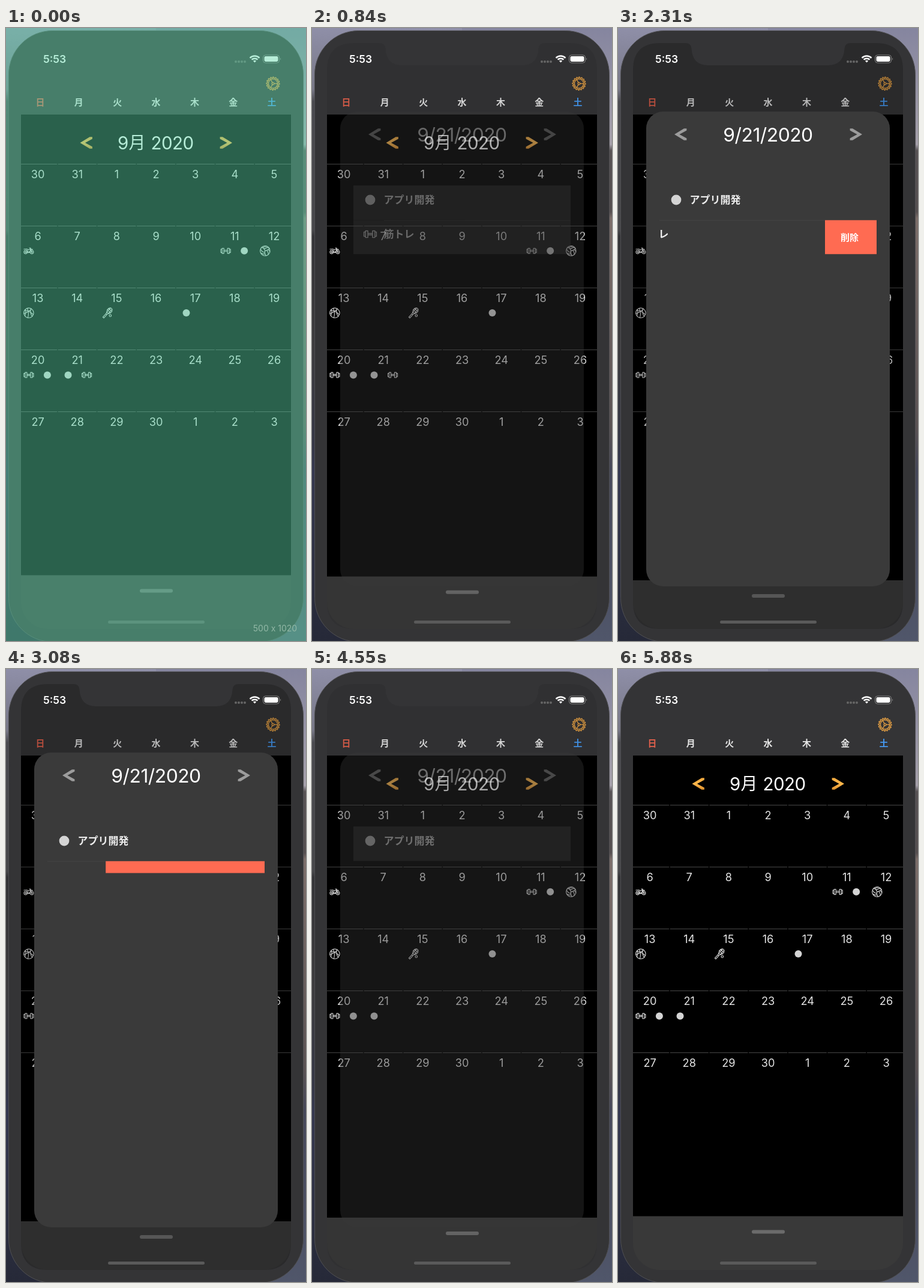
These frames come from a looping animation (500x1020 px, 5950 ms). An HTML page:

```html
<!DOCTYPE html>
<html lang="ja">
<head>
<meta charset="utf-8">
<title>Calendar</title>
<style>
html, body { margin: 0; width: 100%; height: 100%; overflow: hidden; background: #333; }
svg { display: block; width: 500px; height: 1020px; }
text { font-family: Inter, "Noto Sans CJK JP", "Noto Sans CJK", sans-serif; fill: #fff; }
.mid { text-anchor: middle; }
.jp { font-family: "Noto Sans CJK JP", "Noto Sans CJK", sans-serif; font-weight: 700; }
.icon { fill: none; stroke: #dedede; stroke-width: 1.1; stroke-linecap: round; stroke-linejoin: round; }
</style>
</head>
<body>
<svg id="stage" viewBox="0 0 500 1020" xmlns="http://www.w3.org/2000/svg"></svg>
<script>
const LOOP = 5950, STEP = 70;
const stage = document.getElementById('stage');
const $ = id => document.getElementById(id);

// Time points in ms
const OPEN = 700, SWIPE = 1750, REMOVE = 2870, CLOSE = 4340;

const clamp = v => Math.max(0, Math.min(1, v));
const ramp = (t, from, len) => clamp((t - from) / len);
const ease = p => p * p * (3 - 2 * p);
const easeOut = p => 1 - Math.pow(1 - p, 3);

const tag = (name, attrs, body = '') =>
  `<${name} ${Object.entries(attrs).map(([k, v]) => `${k}="${v}"`).join(' ')}>${body}</${name}>`;
const rect = (x, y, width, height, fill, more = {}) => tag('rect', { x, y, width, height, fill, ...more });
const label = (x, y, size, body, more = {}) => tag('text', { x, y, 'font-size': size, ...more }, body);
const path = (d, more = {}) => tag('path', { d, ...more });
const circle = (cx, cy, r, more = {}) => tag('circle', { cx, cy, r, ...more });
const stops = list => list.map(([offset, c]) => tag('stop', { offset, 'stop-color': c })).join('');
const vertical = (id, list) => tag('linearGradient', { id, x1: 0, y1: 0, x2: 0, y2: 1 }, stops(list));

// Icons, centred on 0,0 in a box of about 18 px
const icons = {
  dumbbell: path('M-3 -1H3V1H-3ZM-6 -4.3H-3V4.3H-6ZM3 -4.3H6V4.3H3ZM-8 -2.8H-6V2.8H-8ZM6 -2.8H8V2.8H6Z'),
  dot: circle(0, 0, 6, { fill: '#d4d4d4', stroke: 'none' }),
  moto: circle(-5.2, 2, 2.8) + circle(5.2, 2, 2.8) + circle(-5.2, 2, .8) + circle(5.2, 2, .8) +
    path('M-8 -2.8L-3 -3L-.5 -1.6L2.6 -3.2L5.2 2M1 -4.8H3L4 -2.4H6.5M-5 2L-2 2.8H1.5L3 -2.5M-3 -1L-1 1.5H1.5'),
  basket: circle(0, 0, 8.2) +
    path('M-7 -4.3Q1 -4 7.6 3M-2.6 -7.8Q1 0 -1.5 8M-8.1 1Q0 -1.5 4.5 -6.8M3.6 -7.3Q1.5 1 6 5.6M-6.4 5Q-4 -1.5 -5.8 -5.6'),
  volley: circle(0, 0, 8.2) +
    path('M0 0Q-1 -4.5 -5.5 -6M0 0Q4.5 -1 7.2 -4M0 0Q-1.5 4 1.5 8M-2 -3Q3 -6.5 6 -5.5M-4 -5Q0 -8 3 -7.5M2.5 -1Q6 2 5.2 6.2M5 -2.3Q8 0 8 2M-.5 2.5Q-5 2.5 -7.4 -2.5M-.3 5Q-4 6 -7.2 3.5'),
  racket: tag('g', { transform: 'rotate(42)' },
    tag('ellipse', { cx: 0, cy: -5, rx: 3.9, ry: 5 }) +
    path('M-1.6 -9.3V-.8M1.6 -9.3V-.8M-3.7 -6.6H3.7M-3.7 -3.6H3.7M-2 -.6L-.8 3H.8L2 -.6M-1.1 3H1.1V10.5H-1.1Z')) +
    circle(4.6, 4.4, 1.8)
};
const icon = (name, x, y, scale = 1) =>
  tag('g', { class: 'icon', transform: `translate(${x} ${y}) scale(${scale})` }, icons[name]);

const arrow = (x, y, dir, fill) => path('M-10 0L6 -9.8H10.4V-6.6L-1.6 0L10.4 6.6V9.8H6Z',
  { fill, transform: `translate(${x} ${y}) scale(${dir} 1)` });

function gear(cx, cy) {
  let d = '';
  for (let i = 0; i < 64; i++) {
    const a = i * Math.PI / 32, r = i % 4 < 2 ? 11 : 9;
    d += `${i ? 'L' : 'M'}${(r * Math.cos(a)).toFixed(2)} ${(r * Math.sin(a)).toFixed(2)}`;
  }
  const spokes = [0, 120, 240].map(a => path('M1.8 0H7.8', { transform: `rotate(${a})` })).join('');
  return tag('g', { transform: `translate(${cx} ${cy})`, fill: 'none', stroke: '#e5a044', 'stroke-width': 1.3 },
    path(d + 'Z') + circle(0, 0, 7.6) + circle(0, 0, 1.8) + spokes);
}

const backdrop = () =>
  rect(0, 0, 250, 1020, 'url(#left)') + rect(250, 0, 250, 1020, 'url(#right)') +
  rect(4.5, 4.5, 491, 1017, '#343436', { rx: 73, stroke: '#505053', 'stroke-width': 1 });

function header() {
  const days = [...'日月火水木金土'].map((d, i) => label(57 + i * 64.35, 128.5, 15, d, {
    class: 'mid jp', style: `fill:${i === 0 ? '#e0604c' : i === 6 ? '#4597ee' : '#e6e6e6'}`
  }));
  return gear(445, 92.5) + days.join('');
}

function calendar() {
  const colW = 65.65, left = 20.3, rowY = r => 226.5 + r * 103;
  let out = rect(25, 144, 450, 775, '#000');
  for (let r = 0; r < 5; r++) {
    for (let c = 0; c < 7; c++) {
      const x = left + c * colW, day = r * 7 + c - 1;
      const n = day < 1 ? day + 31 : day > 30 ? day - 30 : day;
      const x1 = Math.max(25, x + .8), x2 = Math.min(475, x + colW - .8);
      out += rect(x1, rowY(r) - .5, x2 - x1, 1, '#484848') +
        label(x + 32.8, rowY(r) + 23, 18.2, n, { class: 'mid', style: 'fill:#e4e4e4' });
    }
  }
  const put = (name, r, c, slot = 0) => icon(name, left + c * colW + 17.6 + slot * 31, rowY(r) + 41 + r * .3);
  out += put('moto', 1, 0) + put('dumbbell', 1, 5) + put('dot', 1, 5, 1) + put('volley', 1, 6) +
    put('basket', 2, 0) + put('racket', 2, 2) + put('dot', 2, 4) +
    put('dumbbell', 3, 0) + put('dot', 3, 0, 1) + put('dot', 3, 1) +
    tag('g', { id: 'mark' }, put('dumbbell', 3, 1, 1));
  out += arrow(133.5, 191, 1, 'url(#gold)') + arrow(367, 191, -1, 'url(#gold)') +
    label(186, 201.5, 29.5, '9') +
    label(204.5, 201, 28, '月', { style: 'font-family:"Noto Sans CJK JP","Noto Sans CJK",sans-serif;font-weight:400' }) +
    label(277, 201.5, 29.5, '2020', { class: 'mid', 'letter-spacing': -.5 });
  return out;
}

const panel = () => tag('g', { 'clip-path': 'url(#screen)' },
  tag('g', { id: 'panel' }, rect(25, 910.5, 450, 100, '#393939') + rect(223, 933.5, 55, 6, '#6b6b6b', { rx: 3 })));

const dim = () => path(
  'M70 25H112Q122 25 122.500 34Q124 62 150 62H350Q376 62 377.500 34Q378 25 388 25H430Q475 25 475 70V955Q475 1000 430 1000H70Q25 1000 25 955V70Q25 25 70 25Z',
  { id: 'dim', fill: '#000' });

// Each part of the card fades by itself, so overlaps show while it opens.
function card() {
  const fade = body => tag('g', { class: 'fade' }, body);
  const row = (y, name, title, scale) => icon(name, 97, y + 24, scale) +
    label(119.500, y + 29.5, 17, title, { class: 'jp', style: 'fill:#ececec' });
  return fade(rect(47, 139, 406, 790, '#3a3a3a', { rx: 28 })) +
    fade(arrow(104, 177, 1, '#9c9c9c') + arrow(397, 177, -1, '#9c9c9c') +
      label(250, 188.5, 31.8, '9/21/2020', { class: 'mid', 'letter-spacing': -.5 })) +
    fade(rect(69, 262, 362, 57.5, '#3a3a3a')) +
    fade(row(262, 'dot', 'アプリ開発', 1.4)) +
    tag('g', { id: 'task', 'clip-path': 'url(#row)' },
      tag('g', { id: 'slide' },
        fade(rect(69, 319.5, 362, 57, '#3a3a3a')) +
        fade(rect(120, 319.5, 311, 1, '#464647') + row(319, 'dumbbell', '筋トレ', 1.3)) +
        rect(431, 319.5, 362, 57, '#ff6b52') +
        label(472, 354, 15, '削除', { class: 'mid jp' })));
}

function statusBar() {
  const arc = r => path(`M${-r * .72} ${-r * .7}A${r} ${r} 0 0 1 ${r * .72} ${-r * .7}`,
    { fill: 'none', stroke: '#fff', 'stroke-width': 2.5 });
  return label(62, 58, 17.5, '5:53', { 'font-weight': 600 }) +
    [383, 388, 393, 398].map(x => circle(x, 56, 2, { fill: '#666' })).join('') +
    tag('g', { transform: 'translate(414.500 57.5)' }, arc(11) + arc(6.8) + path('M0 0L-2.6 -2.7Q0 -4.7 2.6 -2.7Z', { fill: '#fff' })) +
    rect(428.5, 45, 27, 13, 'none', { rx: 4, stroke: '#858585' }) +
    rect(430.5, 47, 23, 9, '#fff', { rx: 2.4 }) +
    path('M457 49.500Q459 51.500 457 53.500Z', { fill: '#858585' }) +
    rect(170, 986, 161, 5, '#5a5a5a', { rx: 2.5 });
}

const tint = () => tag('g', { id: 'tint' },
  rect(0, 0, 500, 1020, '#5dd7a9', { opacity: .45 }) +
  label(448.5, 1004, 14, '500 x 1020', { class: 'mid', style: 'fill:#92b8a6' }));

stage.innerHTML = tag('defs', {},
  vertical('left', [[0, '#8f8fa8'], [.1, '#777786'], [.12, '#4a4a4f'], [.33, '#47474a'], [.34, '#333336'],
    [.52, '#3c3b3d'], [.68, '#343645'], [.72, '#34374f'], [1, '#262938']]) +
  vertical('right', [[0, '#85859f'], [.19, '#a5a0aa'], [.2, '#575254'], [.3, '#554f50'], [.31, '#7b6d69'],
    [.65, '#5a5253'], [.72, '#454759'], [1, '#50566a']]) +
  vertical('gold', [[0, '#f0a83e'], [.5, '#ffb84c'], [1, '#dd8f2c']]) +
  tag('clipPath', { id: 'screen' }, rect(25, 25, 450, 975, '#000', { rx: 45 })) +
  tag('clipPath', { id: 'row' }, rect(69, 319.5, 362, 57, '#000', { id: 'rowBox' }))) +
  backdrop() + header() + calendar() + panel() + dim() + card() + statusBar() + tint();

const fades = [...document.querySelectorAll('.fade')];

function draw(t) {
  const shown = ease(ramp(t, OPEN, 350)) * (1 - ease(ramp(t, CLOSE, 360)));
  fades.forEach(el => el.setAttribute('opacity', shown));
  $('dim').setAttribute('opacity', .2 * shown);
  $('panel').setAttribute('transform', `translate(0 ${8.5 * Math.pow(shown, 1.3)})`);

  const gone = ease(ramp(t, REMOVE, 350));
  const dx = -86 * easeOut(ramp(t, SWIPE, 420)) - 276 * gone;
  $('slide').setAttribute('transform', `translate(${dx} 0)`);
  $('rowBox').setAttribute('height', 57 * (1 - gone));
  $('task').style.display = gone < 1 ? '' : 'none';
  $('mark').style.display = gone < 1 ? '' : 'none';

  $('tint').setAttribute('opacity', 1 - ramp(t, 0, 140));
}

function tick() {
  const t = performance.now() % LOOP;
  draw(Math.floor(t / STEP) * STEP);
  requestAnimationFrame(tick);
}
tick();
</script>
</body>
</html>
```
